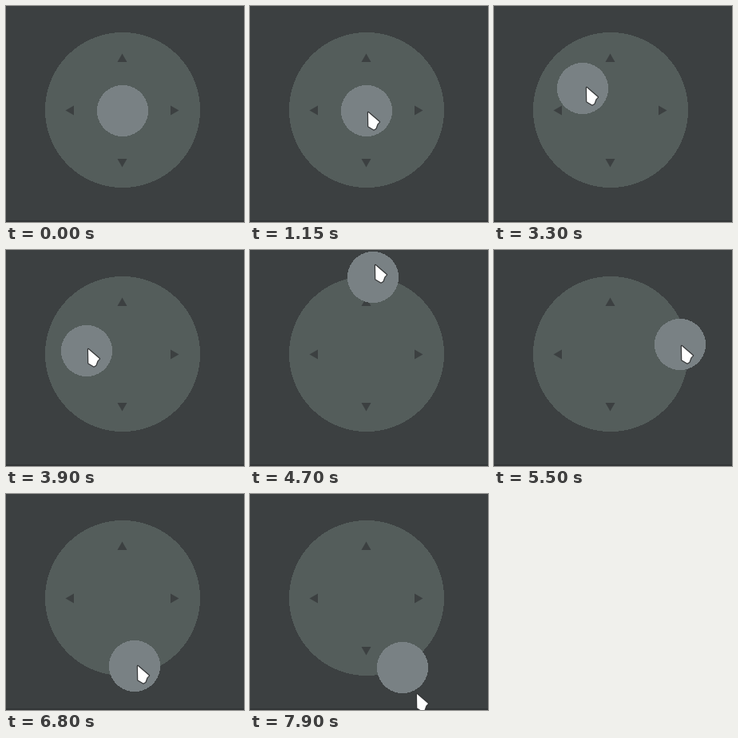
Write an HTML page with a canvas that moves like this. It is 298x270 px and loops after 8 s.

```html
<!DOCTYPE html>
<html lang="en">
<head>
<meta charset="utf-8">
<title>Joystick</title>
<style>
  html, body { margin: 0; width: 100%; height: 100%; overflow: hidden; background: #3c4041; }
  canvas { display: block; width: 298px; height: 270px; }
</style>
</head>
<body>
<canvas id="stage" width="298" height="270"></canvas>
<script>
const ctx = document.getElementById('stage').getContext('2d');
const LOOP = 8000, STEP = 50, LEAD = 16, GRAB = 1870;
const CX = 146, CY = 131, REACH = 97;
const BG = '#3c4041', BASE = '#545d5b', KNOB = '#798184';

// The hand circles the centre: [time, angle in degrees, radius, rest afterwards].
const path = [
  [470, 87, 141], [1150, 87, 0, 720],
  [2100, 170, 25], [2400, 307, 25], [2500, 360, 31], [2700, 450, 22, 20],
  [3150, 540, 51], [3300, 579, 45], [3450, 635, 42], [3550, 760, 37, 20],
  [3900, 907, 45], [4350, 1002, 95, 120], [4700, 994.5, 114, 170],
  [5500, 1071.5, 88], [5700, 1074, 103, 170], [6600, 1168, 117, 110],
  [6800, 1160, 85], [7100, 1130, 70], [7400, 1107.5, 136, 170], [7900, 1142.5, 132]
];
const keys = path.flatMap(([t, a, r, rest]) => rest ? [[t, a, r], [t + rest, a, r]] : [[t, a, r]]);

function rate(i, c) {
  const a = keys[i], b = keys[i + 1];
  return a && b ? (b[c] - a[c]) / (b[0] - a[0]) : 0;
}

// Harmonic mean keeps the curve free of overshoot and still at rests.
function slope(i, c) {
  const a = rate(i - 1, c), b = rate(i, c);
  return a * b > 0 ? 2 * a * b / (a + b) : 0;
}

function sample(t, c) {
  const next = keys.findIndex(k => k[0] > t);
  if (next === 0) return keys[0][c];
  if (next < 0) return keys[keys.length - 1][c];
  const i = next - 1, a = keys[i], b = keys[next];
  const d = b[0] - a[0], u = (t - a[0]) / d, ease = u * u * (3 - 2 * u);
  return a[c] + (b[c] - a[c]) * ease
    + d * u * (1 - u) * ((1 - u) * slope(i, c) - u * slope(next, c));
}

function hand(t, reach = Infinity) {
  const angle = sample(t, 1) * Math.PI / 180, r = Math.min(reach, sample(t, 2));
  return [Math.round(CX + r * Math.cos(angle)), Math.round(CY + r * Math.sin(angle))];
}

// Filled row by row for a hard, unsmoothed edge.
function disc(x, y, r, fill) {
  ctx.fillStyle = fill;
  for (let row = -r; row < r; row++) {
    const half = Math.round(Math.sqrt(r * r - (row + 0.5) ** 2));
    ctx.fillRect(x - half, y + row, 2 * half, 1);
  }
}

function trace(points) {
  ctx.beginPath();
  points.forEach(([x, y]) => ctx.lineTo(x, y));
  ctx.closePath();
}

function drawArrows() {
  ctx.fillStyle = BG;
  for (let i = 0; i < 4; i++) {
    ctx.save();
    ctx.translate(145.5, 130.5);
    ctx.rotate(i * Math.PI / 2);
    trace([[0, -71], [6, -60.5], [-6, -60.5]]);
    ctx.fill();
    ctx.restore();
  }
}

function drawPointer([x, y]) {
  ctx.save();
  ctx.translate(x + 2, y + 2);
  trace([[0, 0], [14, 12], [11.5, 14.5], [9.5, 20], [7, 21.5], [0.3, 17.5]]);
  ctx.lineJoin = 'round';
  ctx.lineWidth = 2.4;
  ctx.strokeStyle = '#353738';
  ctx.stroke();
  ctx.fillStyle = '#fff';
  ctx.fill();
  ctx.restore();
}

function draw(t) {
  ctx.fillStyle = BG;
  ctx.fillRect(0, 0, 298, 270);
  ctx.fillStyle = '#333637';
  ctx.fillRect(0, 268, 298, 2);
  disc(146, 130, 97, BASE);
  drawArrows();
  const [x, y] = hand(t, t > GRAB ? REACH : 0);
  disc(x, y, 32, KNOB);
  drawPointer(hand(t + LEAD));
}

const start = performance.now();
function tick() {
  const t = (performance.now() - start) % LOOP;
  draw(Math.floor(t / STEP) * STEP);
  requestAnimationFrame(tick);
}
tick();
</script>
</body>
</html>
```
